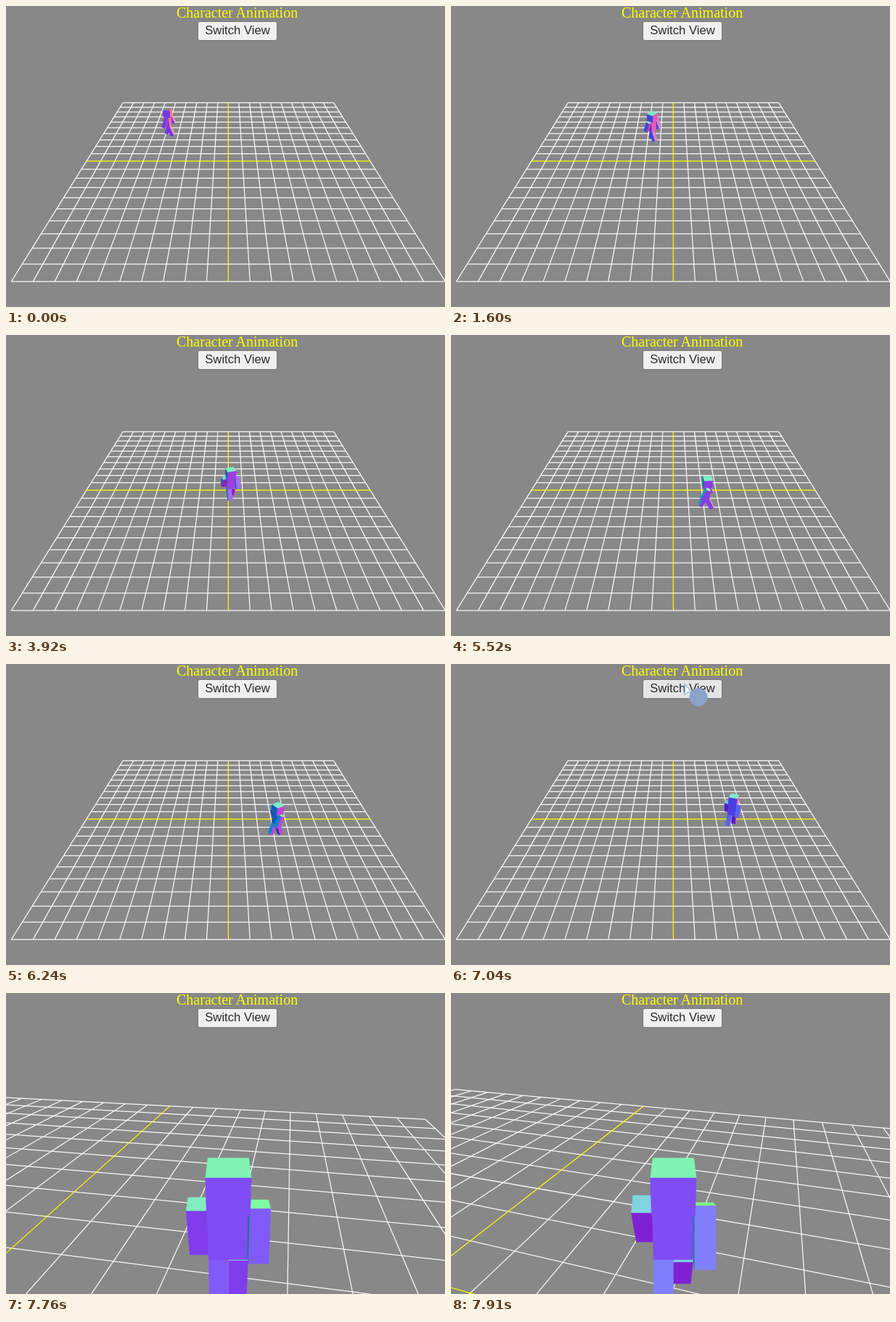
An HTML page with a canvas that plays this animation: 605x415 px, repeating every 7990 ms.

```html
<!DOCTYPE html>
<html lang="en">
<head>
<meta charset="utf-8">
<title>Character Animation</title>
<style>
  html, body { margin: 0; width: 100%; height: 100%; overflow: hidden; background: #888; }
  canvas, #title, #button, #cursor { position: absolute; }
  canvas { left: 0; top: 0; }
  #title {
    left: 235px; top: -2px; white-space: nowrap; color: #ff0;
    font: 20px/23px "Liberation Serif", serif;
  }
  #button {
    left: 264px; top: 21px; width: 110px; height: 27px; box-sizing: border-box;
    border: 1px solid #767676; border-radius: 3px; background: #efefef; color: #2a2a2a;
    font: 16.67px/23px "Liberation Sans", sans-serif; text-align: center; white-space: nowrap;
  }
  #button.hover { background: #e5e5e5; }
  #cursor { left: 0; top: 0; overflow: visible; }
</style>
</head>
<body>
<canvas id="stage" width="605" height="415"></canvas>
<div id="title">Character Animation</div>
<div id="button">Switch View</div>
<svg id="cursor" width="36" height="36">
  <path d="M0 0V15L4 11.5L10 11Z" fill="#eef6ff" stroke="#6f9fc4"/>
  <circle cx="19" cy="18" r="12.5" fill="#8ba3cb"/>
</svg>
<script>
const ctx = document.getElementById('stage').getContext('2d');
const button = document.getElementById('button');
const cursor = document.getElementById('cursor');
const { sin, cos, PI, floor, min, max, hypot } = Math;

const LOOP = 7990, LAST = 7910, STEP = 80, SWITCH = 7360;
const FOCAL = 470, CX = 306.4, CY = 214, NEAR = 0.1;
const UNIT = 0.0694;          // one character unit, in grid cells
const SWING = 0.428, STRIDE = 400;
const overview = { x: 0, y: 13.333, z: 20, yaw: 0, pitch: 0.588 };

// Walk path: one [x, z] point every 800 ms, starting one step early.
const LEG = 800;
const path = [
  [-6.2, -3.95], [-4.66, -3.83], [-3.1, -3.6], [-1.58, -3.05], [-0.55, -1.9], [0, -0.35],
  [0.2, 1.05], [1, 1.85], [2.25, 2], [3.3, 1.6], [4.06, 0.36], [3.99, -1.01], [3.06, -2.24]
];

// Width, height, depth; pivot x, y; box centre below the pivot; swing direction.
const parts = [
  { size: [8, 8, 8], at: [0, 28], drop: 0, swing: 0 },
  { size: [8, 12, 4], at: [0, 18], drop: 0, swing: 0 },
  { size: [4, 12, 4], at: [-6, 24], drop: 6, swing: -1 },
  { size: [4, 12, 4], at: [6, 24], drop: 6, swing: 1 },
  { size: [4, 12, 4], at: [-2, 12], drop: 6, swing: 1 },
  { size: [4, 12, 4], at: [2, 12], drop: 6, swing: -1 }
];

function walker(t) {
  const i = floor(t / LEG) + 1, s = t / LEG - i + 1;
  const [pos, vel] = [[], []];
  for (const k of [0, 1]) {
    const [a, b, c, d] = path.slice(i - 1, i + 3).map(p => p[k]);
    const c1 = (c - a) / 2, c2 = a - 2.5 * b + 2 * c - d / 2, c3 = (d - a) / 2 + 1.5 * (b - c);
    pos[k] = b + s * (c1 + s * (c2 + s * c3));
    vel[k] = c1 + s * (2 * c2 + 3 * s * c3);
  }
  return { x: pos[0], z: pos[1], yaw: Math.atan2(-vel[0], -vel[1]) };
}

function chase(w) {
  const back = 56 * UNIT;
  return { x: w.x + back * sin(w.yaw), y: 4.22, z: w.z + back * cos(w.yaw), yaw: w.yaw, pitch: 0.419 };
}

// Rotates a world direction into [right, up, depth].
function turn(cam, [x, y, z]) {
  const right = x * cos(cam.yaw) - z * sin(cam.yaw);
  const ahead = -x * sin(cam.yaw) - z * cos(cam.yaw);
  return [right, y * cos(cam.pitch) + ahead * sin(cam.pitch),
          ahead * cos(cam.pitch) - y * sin(cam.pitch)];
}
const toView = (cam, [x, y, z]) => turn(cam, [x - cam.x, y - cam.y, z - cam.z]);
const project = ([r, u, d]) => [CX + FOCAL * r / d, CY - FOCAL * u / d];

function line(cam, p, q, color) {
  let a = toView(cam, p), b = toView(cam, q);
  if (a[2] < b[2]) [a, b] = [b, a];
  if (a[2] <= NEAR) return;
  if (b[2] < NEAR) {
    const s = (a[2] - NEAR) / (a[2] - b[2]);
    b = a.map((v, i) => v + (b[i] - v) * s);
  }
  ctx.strokeStyle = color;
  ctx.beginPath();
  ctx.moveTo(...project(a));
  ctx.lineTo(...project(b));
  ctx.stroke();
}

function drawGrid(cam) {
  ctx.lineWidth = 1.25;
  const pair = (i, color) => {
    line(cam, [-10, 0, i], [10, 0, i], color);
    line(cam, [i, 0, -10], [i, 0, 10], color);
  };
  for (let i = -10; i <= 10; i++) if (i) pair(i, '#f8f8f8');
  pair(0, '#ff0');
}

function drawWalker(cam, w, t, tops) {
  const angle = SWING * cos(PI * (t - 7520) / STRIDE);
  const spin = ([x, y, z]) =>
    [x * cos(w.yaw) + z * sin(w.yaw), y, z * cos(w.yaw) - x * sin(w.yaw)];

  const boxes = parts.map(part => {
    const a = angle * part.swing;
    const swing = ([x, y, z]) => [x, y * cos(a) - z * sin(a), y * sin(a) + z * cos(a)];
    const place = ([x, y, z]) => {
      const [px, py, pz] = swing([x, y - part.drop, z]);
      const [wx, wy, wz] = spin([px + part.at[0], py + part.at[1], pz]);
      return toView(cam, [w.x + wx * UNIT, wy * UNIT, w.z + wz * UNIT]);
    };
    return { part, place, normal: n => turn(cam, spin(swing(n))), far: hypot(...place([0, 0, 0])) };
  }).sort((a, b) => b.far - a.far);

  ctx.lineWidth = 0.4;
  for (const { part, place, normal } of boxes) {
    for (let axis = 0; axis < 3; axis++) for (const side of [-1, 1]) {
      if (!tops && axis === 1) continue;
      const n = [0, 0, 0];
      n[axis] = side;
      const corners = [[-1, -1], [1, -1], [1, 1], [-1, 1]].map(([u, v]) => {
        const c = [0, 0, 0];
        c[axis] = side;
        c[(axis + 1) % 3] = u;
        c[(axis + 2) % 3] = v;
        return place(c.map((k, i) => k * part.size[i] / 2));
      });
      const [r, u, d] = normal(n);
      const [cr, cu, cd] = corners[0];
      if (r * cr + u * cu + d * cd >= 0) continue;
      // Each face is coloured by its direction as the camera sees it.
      const color = `rgb(${[r, u, -d].map(k => Math.round(127.5 + 127.5 * k))})`;
      ctx.fillStyle = ctx.strokeStyle = color;
      ctx.beginPath();
      corners.forEach(c => ctx.lineTo(...project(c)));
      ctx.closePath();
      ctx.fill();
      ctx.stroke();
    }
  }
}

function drawPointer(t) {
  const shown = t >= 6880 && t < 7760;
  const s = max(0, min(1, (t - 6880) / 240));
  const y = 7 + 31 * s;
  cursor.style.visibility = shown ? 'visible' : 'hidden';
  cursor.style.transform = `translate(${332 - 15 * s}px, ${y}px)`;
  button.classList.toggle('hover', shown && y > 21);
}

function render(t) {
  const w = walker(t);
  const cam = t < SWITCH ? overview : chase(w);
  ctx.fillStyle = '#888';
  ctx.fillRect(0, 0, 605, 415);
  drawGrid(cam);
  drawWalker(cam, w, t, t >= STEP);
  drawPointer(t);
}

const start = performance.now();
function tick() {
  const t = max(0, performance.now() - start) % LOOP;
  render(t >= LAST ? LAST : floor(t / STEP) * STEP);
  requestAnimationFrame(tick);
}
tick();
</script>
</body>
</html>
```
